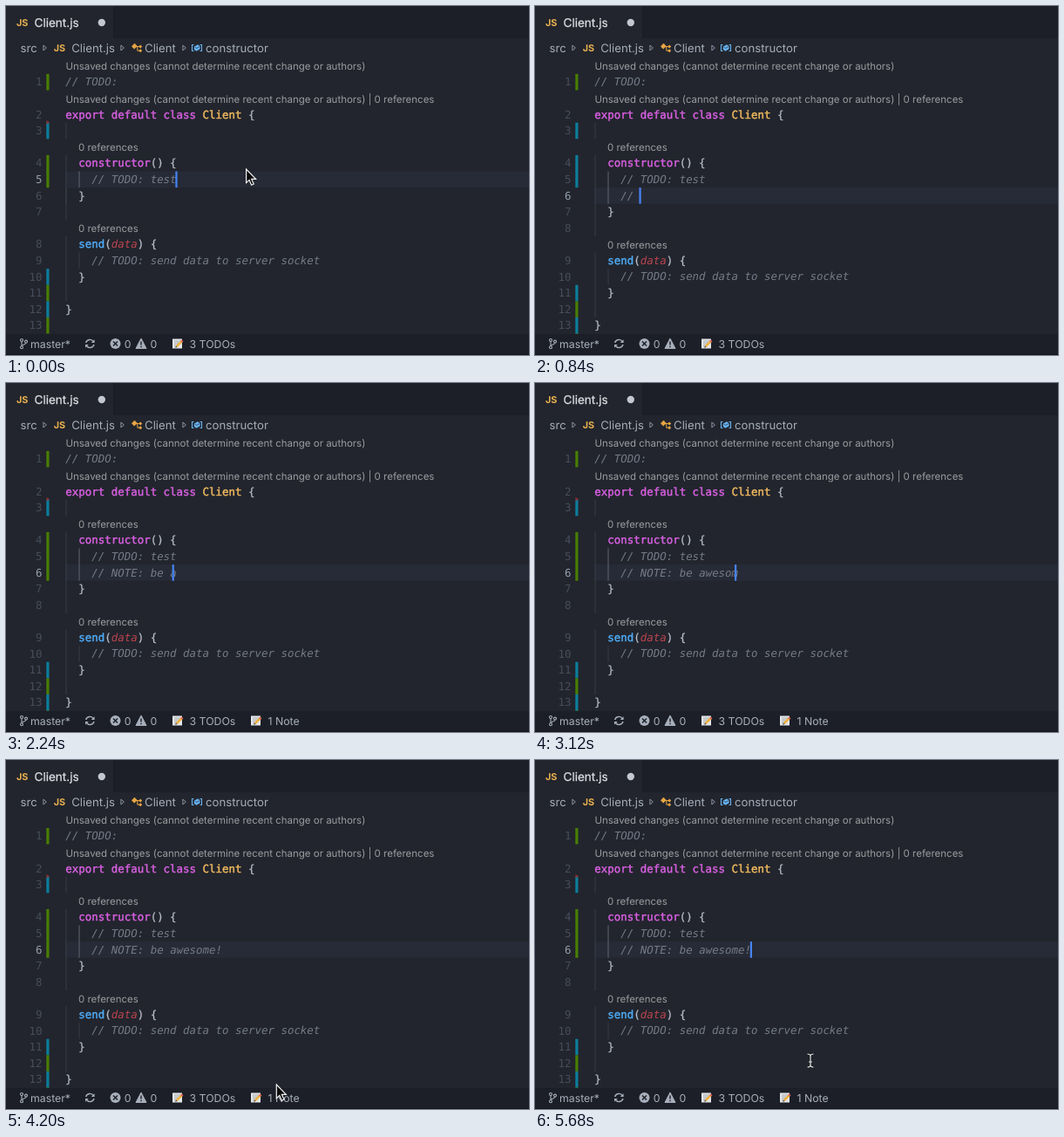
Recreate the animation shown at these times as an HTML page. Size 600x400 px, loop 5720 ms.

```html
<!DOCTYPE html>
<html lang="en">
<head>
<meta charset="utf-8">
<title>Editor typing</title>
<style>
html, body { margin: 0; width: 100%; height: 100%; overflow: hidden; background: #22252d; }
svg { display: block; width: 600px; height: 400px; }
text { white-space: pre; text-rendering: geometricPrecision; font-family: Inter, "Open Sans", sans-serif; }
.code, .num { font: 12.44px "DejaVu Sans Mono", monospace; fill: #b8bec8; }
.code { stroke: #b8bec8; stroke-width: .25px; }
.num { fill: #474d5a; text-anchor: end; }
.num.on { fill: #969dab; }
.code.note, .note { fill: #747b88; stroke: none; font-style: italic; }
.key { fill: #d75fe0; stroke: #d75fe0; stroke-width: .45px; }
.type { fill: #f0b95f; stroke: #f0b95f; stroke-width: .45px; }
.fn { fill: #4fabf5; stroke: #4fabf5; stroke-width: .45px; }
.arg { fill: #bd444f; stroke: none; font-style: italic; }
.lens { font-size: 11.48px; fill: #9a9c9f; }
.tab { font-size: 13.5px; fill: #dcdfe4; stroke: #dcdfe4; stroke-width: .25px; }
.crumb { font-size: 13.2px; fill: #a6adba; }
.js { font-size: 10.8px; font-weight: 700; fill: #e8b04f; }
.bar { font-size: 12.3px; fill: #a8afbc; }
</style>
</head>
<body>
<svg viewBox="0 0 600 400">
  <defs>
    <path id="chevron" d="M-1.6 -3L1.9 0L-1.6 3Z" fill="none" stroke="#8d95a3"/>
    <g id="memo">
      <path d="M0 1H11V12H0Z" fill="#e4e6e8"/>
      <path d="M2 3.5H9M2 5.5H8M2 7.5H6M2 9.5H5" stroke="#9ba0a6" stroke-width=".8"/>
      <path d="M4.8 9.6L10.8 3.6" stroke="#efb23c" stroke-width="2.6"/>
      <path d="M10 4.4L11.6 2.8" stroke="#d9625f" stroke-width="2.6"/>
      <path d="M3.2 11.2L4 8.9L5.6 10.4Z" fill="#4a4038"/>
    </g>
    <path id="ibeam" d="M312.5 337Q316 337 316 339.5Q316 337 319.5 337M316 339V350M312.5 352Q316 352 316 349.5Q316 352 319.5 352M314 346H318"/>
  </defs>

  <rect width="600" height="400" fill="#22252d"/>
  <rect id="active" x="68" width="532" height="18.6" fill="#272b37"/>
  <g id="fixed"></g>
  <g id="lower"></g>
  <g id="numbers"></g>
  <path id="removed" d="M46.5 131L50 133.3L46.5 135.6Z" fill="#8d3038"/>
  <rect id="edited" x="46.3" width="3.2" fill="#487e02"/>
  <rect id="guide" x="83.5" width="1" fill="#626772"/>
  <text id="typed" class="code note" x="98.3"></text>
  <rect id="caret" width="2.2" height="18.6" fill="#4684f5"/>

  <rect x="123.5" width="477" height="37" fill="#1c1f27"/>
  <rect x="123" width="1" height="37" fill="#191c22"/>
  <text class="js" x="12" y="22.5">JS</text>
  <text class="tab" x="32.6" y="23.8">Client.js</text>
  <circle cx="109.8" cy="19" r="4.2" fill="#c3c7cf"/>

  <g class="crumb">
    <text x="16.5" y="52.7">src</text>
    <text class="js" x="54.7" y="52">JS</text>
    <text x="75.2" y="52.7">Client.js</text>
    <text x="159" y="52.7">Client</text>
    <text x="229" y="52.7">constructor</text>
  </g>
  <use href="#chevron" x="44.5" y="48"/>
  <use href="#chevron" x="133.5" y="48"/>
  <use href="#chevron" x="204.5" y="48"/>
  <g fill="#e8a544" stroke="#e8a544">
    <path d="M147.5 42.8L150.7 46L147.2 49.5L144 46.3Z" stroke="none"/>
    <path d="M149 46.5H153M150.8 46.5V51.2H153" fill="none"/>
    <path d="M152.2 46.4L154.2 44.4L156.2 46.4L154.2 48.4ZM152.2 51.2L154.2 49.2L156.2 51.2L154.2 53.2Z" stroke="none"/>
  </g>
  <g fill="none" stroke="#68b4f5" stroke-width="1.1">
    <path d="M215.5 44.5H213.5V51.5H215.5M222.5 44.5H224.5V51.5H222.5"/>
    <path d="M216.3 47L220 45L222 46.5V49L218.5 51L216.3 49.5Z" fill="#68b4f5"/>
    <path d="M216.7 47.2L218.7 48.4L221.8 46.7" stroke="#22252d" stroke-width=".7"/>
  </g>

  <rect y="376" width="600" height="24" fill="#1c1f27"/>
  <rect y="399" width="600" height="1" fill="#121418"/>
  <g fill="none" stroke="#a8afbc" stroke-width="1.1">
    <circle cx="18" cy="383" r="1.5"/><circle cx="18" cy="391.3" r="1.5"/><circle cx="23" cy="384.6" r="1.5"/>
    <path d="M18 384.5V389.8M23 386.1C23 388.4 18.5 387.4 18 389.8"/>
    <path d="M91.6 386A4.8 4.8 0 0 1 100.4 384.8M101 388A4.8 4.8 0 0 1 92.2 389.2" stroke-width="1.4"/>
    <path d="M101.6 382.2V386H97.8ZM91 391.8V388H94.8Z" fill="#a8afbc" stroke="none"/>
  </g>
  <circle cx="125.5" cy="387" r="6" fill="#a8afbc"/>
  <path d="M123 384.5L128 389.5M128 384.5L123 389.5" stroke="#1c1f27" stroke-width="1.5"/>
  <path d="M155 381L161 392.5H149Z" fill="#a8afbc" stroke="#a8afbc" stroke-linejoin="round"/>
  <path d="M155 384.5V388.6M155 389.8V391.3" stroke="#1c1f27" stroke-width="1.4"/>
  <g class="bar">
    <text x="28" y="391.5">master*</text>
    <text x="135.7" y="391.5">0</text>
    <text x="165.5" y="391.5">0</text>
    <text x="210.5" y="391.5">3 TODOs</text>
  </g>
  <use href="#memo" x="191" y="380.5"/>
  <g id="count">
    <use href="#memo" x="281" y="380.5"/>
    <text class="bar" x="300.5" y="391.5">1 Note</text>
  </g>

  <path id="arrow" d="M0 0V15.6L3.5 12.4L6 18.2L8.6 17L6.1 11.4H11Z" fill="#0b0b0c" stroke="#f2f2f2" stroke-width="1.2"/>
  <g id="beam" fill="none">
    <use href="#ibeam" stroke="#15171a" stroke-width="2.6"/>
    <use href="#ibeam" stroke="#e8e8e8" stroke-width="1.2"/>
  </g>
</svg>
<script>
const LOOP = 5720, TICK = 40, ROW = 18.6, CHAR = 7.49, LEFT = 98;
const GREEN = '#487e02', BLUE = '#0c7d9d', DIM = '#383c46';
const NOTE = '// NOTE: be awesome!';
const ENTER = 240;
// Moment at which each next character of NOTE appears.
const KEYS = [440, 520, 640, 920, 1040, 1160, 1280, 1400, 1560, 1700,
  1800, 2040, 2200, 2400, 2560, 2720, 2900, 3070, 3280, 3480];
const LAST = KEYS[KEYS.length - 1];
// Pointer: time, x, y
const PATH = [[3800, 275.6, 187], [4200, 310.3, 372], [4360, 312, 381], [5440, 312, 381], [5600, 315, 350]];

const $ = id => document.getElementById(id);
const mid = row => 68.6 + ROW * row;
const top_ = row => mid(row) - ROW / 2;
const base = row => mid(row) + 4.1;

function add(parent, tag, attrs, text) {
  const el = document.createElementNS('http://www.w3.org/2000/svg', tag);
  set(el, attrs);
  if (text) el.textContent = text;
  parent.append(el);
  return el;
}
function set(el, attrs) {
  for (const k in attrs) el.setAttribute(k, attrs[k]);
}
function show(el, on) {
  el.style.visibility = on ? 'visible' : 'hidden';
}
function code(g, row, indent, ...parts) {
  const line = add(g, 'text', { class: 'code', x: 68.3 + indent * CHAR, y: base(row) });
  for (const [text, kind = ''] of parts) add(line, 'tspan', { class: kind }, text);
}
function lens(g, row, x, text) {
  add(g, 'text', { class: 'lens', x, y: mid(row) + 4.8 }, text);
}
function strip(g, x, width, row, rows, fill) {
  add(g, 'rect', { x, width, y: top_(row), height: ROW * rows, fill });
}

const fixed = $('fixed'), lower = $('lower');
const unsaved = 'Unsaved changes (cannot determine recent change or authors)';
for (const [row, rows] of [[4, 1], [6, 3]]) strip(fixed, 68.5, 1, row, rows, DIM);
for (const [row, rows] of [[8, 2], [11, 4]]) strip(lower, 68.5, 1, row, rows, DIM);
strip(lower, 83.5, 1, 12, 1, DIM);
strip(fixed, 46.3, 3.2, 1, 1, GREEN);
strip(fixed, 46.3, 3.2, 4, 1, BLUE);
[BLUE, GREEN, BLUE, GREEN].forEach((c, i) => strip(lower, 46.3, 3.2, 13 + i, 1, c));

lens(fixed, 0, 68.5, unsaved);
code(fixed, 1, 0, ['// TODO:', 'note']);
lens(fixed, 2, 68.5, unsaved + ' | 0 references');
code(fixed, 3, 0, ['export default class ', 'key'], ['Client', 'type'], [' {']);
lens(fixed, 5, 83, '0 references');
code(fixed, 6, 2, ['constructor', 'key'], ['() {']);
code(fixed, 7, 4, ['// TODO: test', 'note']);
code(lower, 8, 2, ['}']);
lens(lower, 10, 83, '0 references');
code(lower, 11, 2, ['send', 'fn'], ['('], ['data', 'arg'], [') {']);
code(lower, 12, 4, ['// TODO: send data to server socket', 'note']);
code(lower, 13, 2, ['}']);
code(lower, 15, 0, ['}']);

const numbers = [1, 3, 4, 6, 7, 8, 9, 11, 12, 13, 14, 15, 16].map((row, i) =>
  add($('numbers'), 'text', { class: 'num', x: 41.5, y: base(row) }, String(i + 1)));
set($('typed'), { y: base(8) });
set($('edited'), { y: top_(6) });
set($('guide'), { y: top_(7) });

function caretAt(t) {
  const start = [LEFT + 13 * CHAR, top_(7)];
  if (t < ENTER) return start;
  const n = KEYS.filter(k => k <= t).length;
  const from = n ? [LEFT + (n - 1) * CHAR, top_(8)] : start;
  const to = [LEFT + n * CHAR, top_(8)];
  const p = Math.min(1, (t - (n ? KEYS[n - 1] : ENTER)) / 80);
  return from.map((v, i) => v + (to[i] - v) * p);
}
function pointerAt(t) {
  const i = PATH.findIndex(p => p[0] > t);
  if (i < 1) return PATH[i < 0 ? PATH.length - 1 : 0].slice(1);
  const [a, b] = [PATH[i - 1], PATH[i]];
  const p = (t - a[0]) / (b[0] - a[0]), e = p * p * (3 - 2 * p);
  return [a[1] + (b[1] - a[1]) * e, a[2] + (b[2] - a[2]) * e];
}

function draw(t) {
  const split = t >= ENTER;
  const stale = t >= 600 && t < 1080;
  set(lower, { transform: `translate(0 ${split ? ROW : 0})` });
  set($('active'), { y: top_(split ? 8 : 7) });
  set($('guide'), { height: ROW * (split ? 2 : 1) });
  set($('edited'), { height: ROW * (t >= 1080 ? 3 : 2), fill: stale ? BLUE : GREEN });
  show($('removed'), !stale);
  set(numbers[7], { y: base(split ? 10 : 11) });
  numbers.forEach((el, i) => el.classList.toggle('on', i === (split ? 5 : 4)));
  $('typed').textContent = NOTE.slice(0, KEYS.filter(k => k <= t).length);

  const [cx, cy] = caretAt(t);
  set($('caret'), { x: cx - 1, y: cy });
  show($('caret'), t < LAST || Math.floor((t - LAST) / 500) % 2 === 0);
  show($('count'), t >= 1640);

  const [px, py] = pointerAt(t);
  set($('arrow'), { transform: `translate(${px} ${py})` });
  show($('arrow'), t < ENTER || (t >= 3800 && t < 5600));
  show($('beam'), t >= 5600);
}

const begin = performance.now();
function frame() {
  const t = (performance.now() - begin) % LOOP;
  draw(Math.floor(t / TICK) * TICK);
  requestAnimationFrame(frame);
}
draw(0);
requestAnimationFrame(frame);
</script>
</body>
</html>
```
